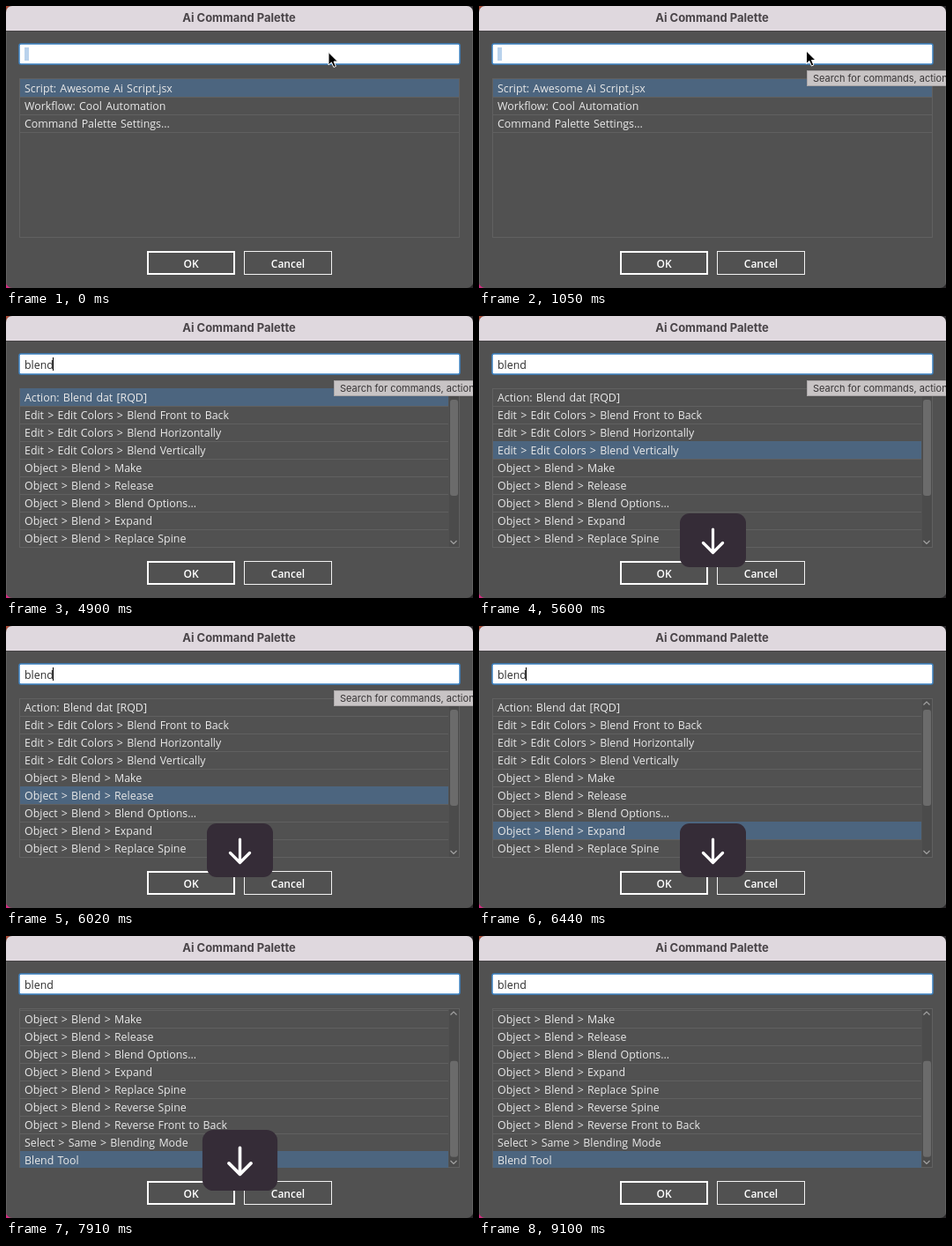
An HTML page that plays this animation: 530x320 px, repeating every 9.17 s.

```html
<!DOCTYPE html>
<html lang="en">
<head>
<meta charset="utf-8">
<title>Command palette</title>
<style>
  html, body { margin: 0; width: 100%; height: 100%; overflow: hidden; background: #292729; }
  svg { display: block; width: 530px; height: 320px; }
  text { white-space: pre; }
  .title { font: 700 13px Inter, sans-serif; fill: #494448; text-anchor: middle; }
  .label { font: 400 12.4px "Open Sans", sans-serif; word-spacing: 1px; fill: #e9e9e9; }
  .typed { fill: #2b2b2b; }
  .button { font: 600 12px "Open Sans", sans-serif; fill: #fff; text-anchor: middle; }
  .tip { font: 400 11px Inter, sans-serif; fill: #373435; }
  .line { stroke: #606060; }
  .chevron { fill: none; stroke: #a2a2a2; stroke-width: 1.2; }
</style>
</head>
<body>
<svg viewBox="0 0 530 320">
  <defs>
    <clipPath id="window"><rect width="530" height="320" rx="7"/></clipPath>
    <clipPath id="listArea"><rect x="15" y="82" width="500" height="181"/></clipPath>
  </defs>
  <rect width="8" height="8" fill="#a84b36"/>
  <rect y="312" width="8" height="8" fill="#d52b83"/>
  <g clip-path="url(#window)">
    <rect width="530" height="320" fill="#515151"/>
    <rect width="530" height="28" fill="#dfd8de"/>
    <path d="M0 28.5H530" stroke="#454345"/>
    <path d="M.5 29V320M529.5 29V320" stroke="#626262"/>
  </g>
  <text class="title" x="264.5" y="18">Ai Command Palette</text>

  <rect x="15" y="43" width="500" height="23" rx="2" fill="#fff" stroke="#3d83c2" stroke-width="1.5"/>
  <rect id="selection" x="21" y="47" width="5" height="15" fill="#b9d2ec"/>
  <text id="typed" class="label typed" x="21" y="59.5"></text>
  <rect id="caret" y="47" width="1" height="15" fill="#000"/>

  <path class="line" d="M15 82.5H515M15 262.5H515M15.5 82V263M514.5 82V263"/>
  <g id="list" clip-path="url(#listArea)"></g>
  <g id="scrollbar">
    <rect x="503" y="83" width="11" height="179" fill="#4b4b4b"/>
    <rect id="thumb" x="504" width="9" height="109" rx="3" fill="#6b6b6b"/>
    <path class="chevron" d="M504.5 89.5l3.5-3.5 3.5 3.5M504.5 255l3.5 3.5 3.5-3.5"/>
  </g>

  <rect x="161" y="279" width="98" height="25" fill="none" stroke="#fff" stroke-width="2"/>
  <rect x="270.5" y="278.5" width="99" height="26" fill="none" stroke="#f2f2f2"/>
  <text class="button" x="210" y="296.5">OK</text>
  <text class="button" x="320" y="296.5">Cancel</text>

  <g id="tooltip">
    <rect x="372.5" y="73.5" width="170" height="17" fill="#c8c4c5" stroke="#aaa6a7"/>
    <text class="tip" x="379" y="86">Search for commands, actions</text>
  </g>
  <path id="cursor" d="M0 0V14.5L3.4 11.4L5.9 17L8.4 15.9L6 10.5H10.5Z" fill="#000" stroke="#fff" stroke-width="1"/>
  <g id="key">
    <rect x="-37.5" y="-30.5" width="75" height="61" rx="11" fill="#352c37"/>
    <path d="M0-12.5V13.5M-11 3L0 14L11 3" fill="none" stroke="#fff" stroke-width="3.2" stroke-linecap="round" stroke-linejoin="round"/>
  </g>
</svg>
<script>
const LOOP = 9170, STEP = 70, ROW = 20;
const startItems = ["Script: Awesome Ai Script.jsx", "Workflow: Cool Automation", "Command Palette Settings..."];
const blendItems = [
  "Action: Blend dat [RQD]",
  ...["Front to Back", "Horizontally", "Vertically"].map(s => "Edit > Edit Colors > Blend " + s),
  ...["Make", "Release", "Blend Options...", "Expand", "Replace Spine", "Reverse Spine", "Reverse Front to Back"]
    .map(s => "Object > Blend > " + s),
  "Select > Same > Blending Mode",
  "Blend Tool"
];
const typeTimes = [3220, 3360, 3500, 3570, 3710];
const filterTime = 3290;
const pressTimes = [5250, 5390, 5460, 5670, 5880, 6090, 6300, 6650, 6980, 7280, 7560, 7840];
const caretToggles = [3220, 4270, 4900, 5460, 6020, 6580, 7140, 7700, 8400, 8960];
const cursorPath = [[0, 366, 52.5], [70, 370, 50], [140, 374.5, 48], [280, 374.5, 49], [420, 373, 50], [490, 371.5, 51]];

const $ = id => document.getElementById(id);
const clamp = x => Math.max(0, Math.min(1, x));
const passed = (times, t) => times.filter(time => time <= t).length;
const show = (id, on) => $(id).setAttribute("opacity", Number(on));

function drawList(items, selected, top, right) {
  $("list").innerHTML = items.map((item, i) => {
    const y = top + i * ROW;
    const fill = i === selected ? `<rect x="16" y="${y}" width="${right - 16}" height="${ROW}" fill="#4c657f"/>` : "";
    return `${fill}<path class="line" d="M16 ${y + ROW + .5}H${right}"/>
      <text class="label" x="21" y="${y + 15}">${item.replace(/>/g, "&gt;")}</text>`;
  }).join("");
}

let lastTime = -1;
function render(t) {
  if (t === lastTime) return;
  lastTime = t;

  const typedCount = passed(typeTimes, t);
  $("typed").textContent = "blend".slice(0, typedCount);
  show("selection", typedCount === 0);
  show("caret", passed(caretToggles, t) % 2);
  $("caret").setAttribute("x", typedCount ? Math.floor(20.5 + $("typed").getComputedTextLength()) : 21);

  const filtered = t >= filterTime;
  const selected = passed(pressTimes, t);
  const scroll = Math.min(78, Math.max(0, selected - 8) * ROW);
  if (filtered) drawList(blendItems, selected, 82 - scroll, 502);
  else drawList(startItems, 0, 83, 514);
  show("scrollbar", filtered);
  $("thumb").setAttribute("y", 95 + scroll * .6);

  const [, x, y] = cursorPath[passed(cursorPath.map(p => p[0]), t) - 1];
  $("cursor").setAttribute("transform", `translate(${x} ${y})`);
  show("cursor", typedCount === 0);
  show("tooltip", Math.min(clamp((t - 700) / 140), clamp((6160 - t) / 140)));

  const age = t - (pressTimes[selected - 1] ?? t);
  const scale = 1 + .135 * clamp((140 - age) / 70);
  $("key").setAttribute("transform", `translate(265.5 254.5) scale(${scale})`);
  show("key", selected ? clamp((9100 - t) / 350) : 0);
}

const start = performance.now();
function tick() {
  const t = (performance.now() - start) % LOOP;
  render(Math.floor(t / STEP) * STEP);
  requestAnimationFrame(tick);
}
tick();
</script>
</body>
</html>
```
